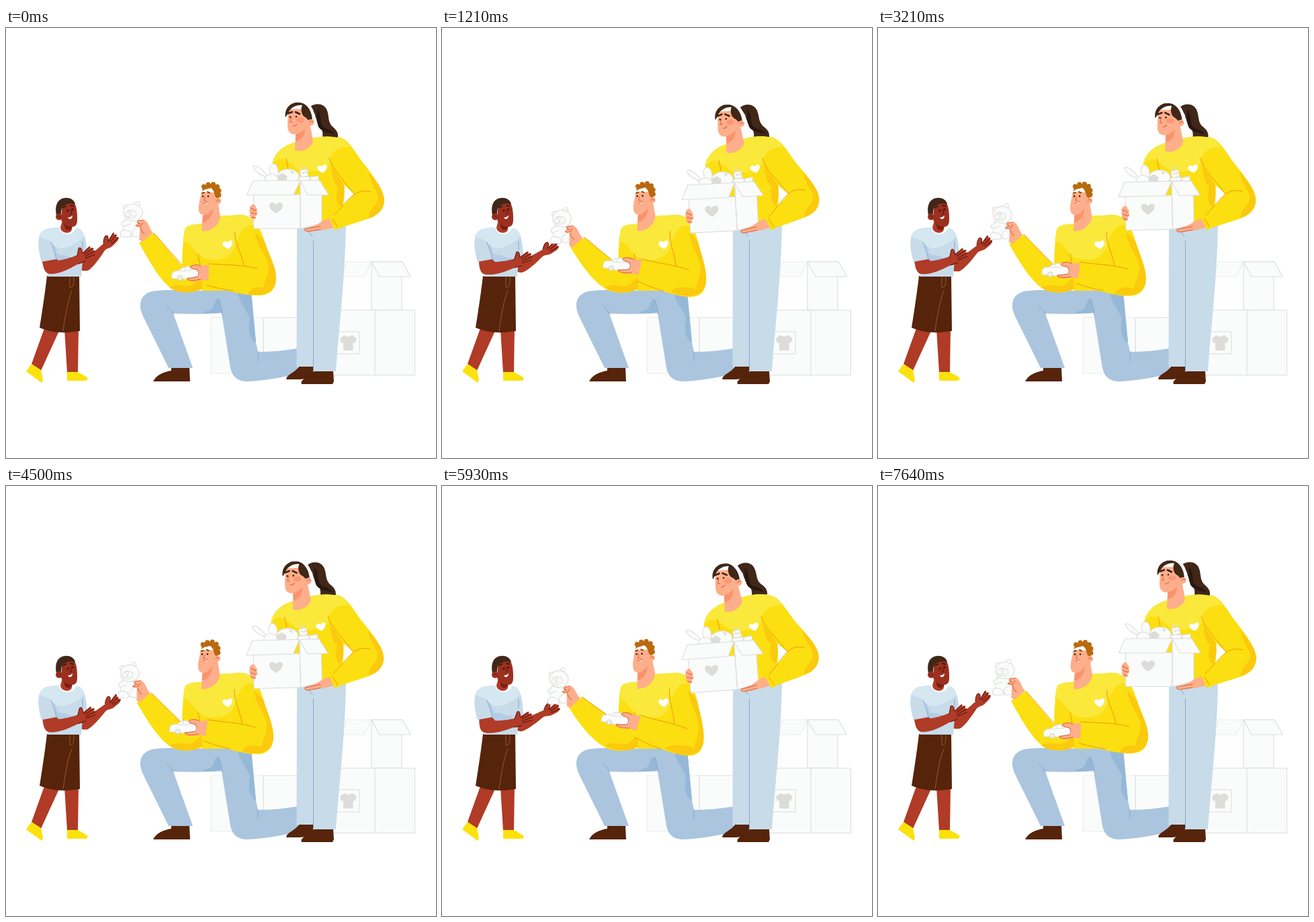
Animation of 640 by 640 pixels, one loop 7710 ms. Source, as an HTML page:

```html
<!DOCTYPE html>
<html lang="en">
<head>
<meta charset="utf-8">
<title>Toy donation</title>
<style>
html, body { margin: 0; width: 100%; height: 100%; overflow: hidden; background: #fff; }
svg { display: block; width: 100vw; height: 100vh; --k: 0; }
path, ellipse, circle { stroke-linecap: round; stroke-linejoin: round; }
/* --x, --y and --r say how far a part travels while --k goes from 0 to 1 */
.m {
  --x: 0; --y: 0; --r: 0;
  transform: translate(calc(var(--k) * var(--x) * 1px), calc(var(--k) * var(--y) * 1px))
    rotate(calc(var(--k) * var(--r) * 1deg));
}
.card { fill: #fafcfb; stroke: #dedddb; stroke-width: 1.1; }
.pale { stroke: #ecebea; }
.grey { fill: #dddcd8; }
.white { fill: #fff; }
.yel { fill: #fbdf10; }
.lite { fill: #fae83a; }
.gold { fill: #fbc90d; }
.seam { fill: none; stroke: #f2960f; stroke-width: 1; }
.skin { fill: #fdae8a; }
.blush { fill: #f9936d; }
.sline { fill: none; stroke: #e0603c; stroke-width: 1; }
.jean { fill: #abc5df; }
.denim { fill: #96b8d8; }
.sky { fill: #c8dbe9; }
.crease { fill: none; stroke: #83a6ca; stroke-width: 1; }
.dark { fill: #55240a; }
.boy { fill: #b03b27; }
.face { fill: #9c3020; }
.bline { fill: none; stroke: #58150d; stroke-width: 1; }
.hair { fill: #402718; }
.brow { fill: none; stroke: #3a2013; stroke-width: 2; }
.ginger { fill: #b96a0d; }
</style>
</head>
<body>
<svg viewBox="0 0 640 640">
  <defs>
    <path id="heart" d="M0 8C-5 5-10 1-10-4C-10-9-3-10 0-5C3-10 10-9 10-4C10 1 5 5 0 8Z"/>
  </defs>

  <g id="stack">
    <path class="card pale" d="M305 431H383V514H305Z"/>
    <path class="card" d="M383 431H490V516H383Z"/>
    <path d="M490 348H544V420H490Z" fill="#fdfefd"/>
    <path class="card pale" d="M508 348H544L533 370H498Z"/>
    <path class="card" d="M544 348H589V420H544Z"/>
    <path class="card" d="M544 348H590L602.500 370H556Z"/>
    <path class="card" d="M480 420H549V516.500H480ZM549 420H608.500V516.500H549Z"/>
    <path class="card" d="M480 452H526V485H480Z"/>
    <path class="grey" d="M504 457C507 460 512 460 515 457L522 462L519 469L516.500 468V480H502V468L499 469L497 462Z"/>
  </g>

  <g id="kneeling-legs">
    <path class="jean" d="M318 391H365L372 468L375 482C395 482 415 480 434 477V515C410 520 385 525 360 526C343 526 337 518 334 506L321 425Z"/>
    <path class="denim" d="M345 394H365L372 468C362 463 360 448 363 432C359 420 349 412 345 394Z"/>
    <path class="jean" d="M225 391C245 389 280 391 320 391L322 424C300 426 275 426 249 425L278 506H242L204 429C194 408 203 392 225 391Z"/>
    <path class="denim" d="M292 425C297 419 305 423 309 413C310 406 313 404 318 404L321 424Z"/>
    <path class="crease" d="M239 413L246 420L249 426M313 404C318 403 319 409 322 426M375 482V495"/>
    <path class="dark" d="M219 526C224 516 235 512 246 510V506H273L274 526Z"/>
  </g>

  <g id="standing-legs">
    <path class="dark" d="M417 522C419 515 430 513 436 504H457V518C450 522 443 523 433 523H418Z"/>
    <path class="dark" d="M440 530C437 523 450 521 458 511H487L488 526L486 530Z"/>
    <path class="sky" d="M433 290H506C505 370 496 440 491 511H457.500V504H432.500Z"/>
    <path class="crease" d="M457.500 317V510M452 304C453 307 454 309 456 310"/>
  </g>

  <g id="boy">
    <path class="boy" d="M57 447L79 451L52 510L38 500ZM87 448H108L107 513H91Z"/>
    <path d="M38 500L52 509L55 524L53 528L30 511ZM91 512H107L121 520Q123 525 117 525H91Z" fill="#fbe20c"/>
    <path class="dark" d="M61 369H109L110 451C100 452 92 454 82 453C70 453 60 450 50 446C54 420 58 395 61 369Z"/>
    <path d="M95 371V386C100 387 101 382 101 371M98 391C91 408 88 430 85 451" fill="none" stroke="#9a5733"/>
    <g class="m" style="--x:-2;--y:3;--r:15;transform-origin:118px 355px">
      <path class="boy" d="M108 345C122 343 133 331 145 321C145 315 147 308 150 309C153 310 152 313 152 316L159 305Q162 304 161 308L163 307Q166 307 164 311L167 311Q169 313 165 318L160 323C156 328 151 327 147 331C138 345 129 357 122 361C117 362 112 361 106 360Z"/>
      <path class="bline" d="M145 320C145 314 147 308 150 309C153 310 152 313 152 318M153 317L160 305M155 319L164 308M157 321L167 312"/>
    </g>
    <path class="sky" d="M79 297C64 297 51 299 49 313C47 325 50 337 53 348L70 344L62 370H112L114 346L121 344C121 328 119 308 112 301C109 298 105 298 101 297Z"/>
    <path d="M79 297C64 297 53 299 49 314C60 312 66 317 70 322C76 330 90 328 99 323C107 319 111 315 117 310C115 301 106 298 101 297Z" fill="#d5e7f1"/>
    <path d="M70 322C77 327 73 336 81 338C92 336 96 346 105 341L103 347L77 352Z" fill="#b3cde6"/>
    <path class="white" d="M79 296C80 309 100 311 104 298L100 296L97 302H86Z"/>
    <path class="boy" d="M84 286L81 297C82 307 98 307 98 299L99 288Z"/>
    <path d="M85 289L99 294C98 300 92 303 88 298Z" fill="#7b1f13"/>
    <path class="face" d="M84 257H97C102 259 104 264 105 270C106 276 106 281 106 285C106 292 104 296 98 296C89 295 84 291 82 285Z"/>
    <path class="hair" d="M75 279C74 273 73 266 77 259C82 252 92 251 98 255C101 257 103 260 103 263C97 259 92 262 86 264C81 268 83 275 81 280Z"/>
    <circle class="face" cx="79" cy="281" r="5"/>
    <path class="bline" d="M77 280Q80 278 81 283M96 270L98 276L95 277"/>
    <path d="M85 267L89 265M96 264L100 265" class="brow"/>
    <g fill="#3a0d08"><circle cx="92" cy="272" r="1.400"/><circle cx="99" cy="270" r="1.400"/></g>
    <path class="white" d="M92 282C95 282 97 281 99 279C99 285 94 286 92 282Z"/>
    <g class="m" style="--r:8;transform-origin:58px 356px">
      <path class="boy" d="M53 342L73 342L78 346C90 344 99 341 106 338L108 328Q111 325 113 331L114 334L124 325Q127 325 125 328L129 327Q132 328 129 331L132 331Q134 333 131 335L133 336Q134 339 128 341L120 346C115 350 111 350 106 352C95 358 81 366 66 366C57 366 55 355 53 342Z"/>
      <path class="bline" d="M106 339L108 328Q111 325 113 331L114 335M115 335L124 326M117 337L129 328M118 340L132 332M118 343L132 337M108 351L118 347"/>
    </g>
    <path class="sky" d="M50 311C60 314 67 320 70 326L75 344L53 348C49 335 47 322 50 311Z"/>
    <path class="crease" d="M67 319C71 328 73 336 75 344M114 318V330"/>
  </g>

  <g id="kneeling-man">
    <path class="yel" d="M293 291C280 293 269 292 266 300C263 320 262 342 262 365L292 391H366L372 300C368 284 358 278 348 278L317 280Z"/>
    <path class="lite" d="M293 291C280 293 269 292 266 300L263 317C279 318 279 339 300 344C325 349 341 337 343 314C342 297 353 291 366 290C360 278 348 278 317 280Z"/>
    <path class="seam" d="M286 337L289 354"/>
    <use href="#heart" class="white" transform="translate(330 323) rotate(-8) scale(.75)"/>

    <path class="yel" d="M220 305L265 358L292 362V388C280 395 262 395 250 390C231 380 214 348 198 320Z"
      data-to="M210 313L265 354L292 362V388C280 395 262 396 248 391C226 382 205 353 189 327Z"/>
    <path class="gold" d="M243 386C252 380 263 384 270 384C278 385 283 378 291 371L292 388C278 396 254 395 243 386Z"/>
    <path class="seam" d="M220 305L262 353" data-to="M210 313L262 353"/>
    <g class="m" style="--x:-12;--y:10.500;--r:-3;transform-origin:205px 298px">
      <g class="card">
        <circle cx="178" cy="267" r="3.700"/><circle cx="195" cy="262" r="3.700"/>
        <path d="M177 285C174 294 174 304 179 310L196 309C203 303 203 291 198 284Z"/>
        <ellipse cx="189" cy="274.500" rx="14" ry="12.500"/>
        <ellipse cx="186" cy="277" rx="8" ry="6"/>
        <path d="M178 287C171 289 170 293 175 295L184 292M177 301C170 300 168 309 173 311H186C188 303 182 301 177 301ZM194 298C187 299 186 308 191 311L200 310"/>
      </g>
      <path d="M182 274Q185 270 188 274L185 277ZM185 277V280L181 281M185 280L189 279" fill="none" stroke="#dedddb"/>
      <path class="skin" d="M219 305C213 299 213 289 205 285L196 287Q194 291 198 292L193 294Q195 297 200 295C198 302 200 307 198 315L203 318Z"/>
      <path class="sline" d="M204 286L196 287Q194 290 199 291L193 294Q196 297 201 294L204 290M200 296Q202 304 206 306"/>
    </g>

    <g class="m" style="--x:-1;--y:-1;--r:-2.800;transform-origin:305px 292px">
      <path class="skin" d="M291 244L312 245L316 262L319 281C317 296 302 304 291 302L293 278C287 277 286 272 287 263Z"/>
      <path class="blush" d="M293 279C300 278 307 272 308 268C308 280 302 287 292 290Z"/>
      <path class="ginger" d="M292 243C292 236 298 232 306 232C315 232 320 240 318 252L314 254C309 250 312 243 305 238C300 240 296 239 292 243Z"/>
      <g class="ginger"><circle cx="294.500" cy="236" r="3.500"/><circle cx="301" cy="233" r="3.500"/><circle cx="308.500" cy="232.500" r="3.500"/><circle cx="314.500" cy="236" r="3.500"/><circle cx="317" cy="242" r="3.500"/><circle cx="317" cy="248.500" r="3.500"/></g>
      <circle class="skin" cx="315.500" cy="257.500" r="4.500"/>
      <path class="sline" d="M313 258Q316 253 318 258M296 251L295 257H298"/>
      <path d="M292 246L295 245M300 244L303 245.500" class="brow" style="stroke:#8a4b08"/>
      <g fill="#321a10"><circle cx="293" cy="250.500" r="1.300"/><circle cx="301" cy="250.500" r="1.300"/></g>
      <path class="white" d="M294 260Q298 262 301 258Q300 265 294 260Z"/>
      <path class="sline" d="M294 260Q298 262 301 258"/>
    </g>

    <path class="yel" d="M349 278C368 278 378 295 385 318C392 340 402 355 402 372C402 389 393 398 376 398C350 398 322 389 299 383L302 351L355 353L341 310Z"
      data-to="M349 278C368 278 374 295 380 318C385 340 391 355 391 374C391 391 384 401 368 401C345 400 314 387 288 375L296 342L350 356L339 310Z"/>
    <path class="gold" d="M371 304C374 330 388 335 391 355C391 370 384 375 383 387C374 385 364 385 360 397C385 400 402 392 402 372C402 355 392 340 385 318Z"
      data-to="M367 304C370 330 380 335 383 353C384 370 379 378 376 390C364 384 345 384 335 391C363 405 391 404 391 374C391 355 385 340 380 318Z"/>
    <path class="lite" d="M349 278C360 278 368 285 374 295C357 290 349 302 345 315L341 310Z"
      data-to="M349 278C360 278 365 285 371 295C355 290 348 302 343 315L339 310Z"/>
    <path class="seam" d="M341 304C339 318 350 333 354 353M302 351C327 353 352 352 374 358M299 383C315 387 327 390 338 391"
      data-to="M339 302C337 318 345 335 347 354M296 342C320 350 345 352 366 361M288 375C303 382 315 388 327 391"/>
    <g class="m" style="--x:-9;--y:-10;--r:11;transform-origin:301px 368px">
      <path class="skin" d="M302 352C293 356 287 351 280 353Q273 355 274 358L283 360C278 362 273 368 269 373L276 376L288 374L301 376Z"/>
      <path class="card" d="M247 373Q245 363 252 362L258 361C263 355 271 354 279 356L285 361Q290 366 286 371L275 373Q271 370 267 374L263 373Z"/>
      <path d="M259 362L279 360M266 356V361" fill="none" stroke="#dedddb"/>
      <circle cx="259" cy="372" r="3.500" fill="#eeeeec" stroke="#d5d4d0"/>
      <path class="skin" d="M270 375Q271 371 280 371L290 368L293 375L278 377Z"/>
      <path class="skin" d="M302 353C291 357 286 351 278 353Q272 355 276 358L286 360L292 366L302 366Z"/>
      <path class="sline" d="M290 354Q283 351 276 354Q272 357 277 358L285 360Q289 366 285 370L270 373Q270 376 279 376L290 374"/>
    </g>
  </g>

  <g id="standing-woman">
    <g class="m" style="--r:-3.700;transform-origin:470px 297px">
      <path class="hair" d="M453 117C461 111 474 112 478 123C481 131 479 139 485 146C491 151 495 155 494 163L471 163C474 148 462 145 460 129Z"/>
      <path d="M463 121C471 128 466 139 471 146C475 151 484 150 489 158C478 156 465 153 464 143C461 137 464 130 463 121Z" fill="#291710"/>
      <path class="yel" d="M396 212C397 187 413 174 432 170L456 164C480 159 502 161 511 174L503 230C506 250 500 268 500 294H400Z"/>
      <path class="lite" d="M396 203C399 185 413 174 432 170L456 164C480 159 502 161 513 177C492 177 488 188 484 199C476 215 447 218 432 209C417 195 408 188 396 203Z"/>
      <path class="gold" d="M484 205C491 217 497 225 503 233C504 247 503 255 499 266C491 262 491 250 494 237C485 228 486 216 484 205Z"/>
      <path class="seam" d="M417 194L420 210"/>
      <use href="#heart" class="white" transform="translate(471 210) rotate(-10) scale(.73)"/>
      <g class="m" style="--x:-1;--y:1.300">
        <path class="skin" d="M420 121L450 120L453 146L457 168C456 178 441 186 430 182L431 158C423 159 419 154 419 146Z"/>
        <path class="blush" d="M431 158C438 157 443 152 445 150C445 162 438 167 431 169Z"/>
        <ellipse cx="438" cy="137" rx="6" ry="4" fill="#fb9878"/>
        <path class="hair" d="M416 133C414 119 424 110 438 110C451 110 459 120 458 136L452 139L446 133C440 131 438 121 441 115C433 114 423 118 420 127Z"/>
        <path d="M432 110C446 108 456 120 457 137C460 130 456 112 441 109Z" class="white" stroke="#fff" stroke-width="2"/>
        <path d="M461 133C463 137 463 143 462 148L459 143Z" class="white"/>
        <circle class="skin" cx="454" cy="140.500" r="4.800"/>
        <path class="sline" d="M452 141Q455 136 457 140M425 132L423 140H426M427 146Q431 146 433 143"/>
        <path d="M420 127L426 125M431 125L437 128" class="brow" style="stroke-width:2.600"/>
        <g fill="#321a10"><circle cx="423" cy="132.500" r="1.300"/><circle cx="432" cy="132" r="1.300"/></g>
      </g>
    </g>

    <g class="m" style="--x:1.300;--y:1.800;--r:-3.700;transform-origin:470px 297px">
      <g class="card">
        <path d="M388 222C379 220 369 212 368 206C372 202 381 210 388 219ZM395 220C390 209 393 202 399 202C405 204 406 214 405 222Z"/>
        <ellipse cx="395" cy="225" rx="10" ry="7.500"/>
        <ellipse cx="420" cy="221" rx="16" ry="11"/>
        <path d="M437 212L448 210L450 220L439 222ZM440 211L438 206M445 210L443 205M436 222L452 221V230H436ZM453 222L465 220V228H453Z"/>
      </g>
      <g class="grey"><path d="M404 220L412 216L419 221L417 228H406ZM422 212L428 213L427 218Z"/><circle cx="442" cy="215.500" r="1.500"/><circle cx="446" cy="215" r="1.500"/></g>
      <g class="card">
        <path d="M438 227H467L470 248V291L438 298.500Z"/>
        <path d="M368.500 248H438V298.500H368.500Z"/>
        <path d="M368 227H438L428 248.500H358.500Z"/>
        <path d="M438 227H467L480 248.500H449Z"/>
        <path d="M438 227V298" fill="none"/>
      </g>
      <use href="#heart" class="grey" transform="translate(402 268)"/>
      <path class="skin" d="M368 262Q362 265 363 269Q361 274 364 276Q361 280 365 281Q364 285 371 284L372 279Q376 276 373 273Q375 269 372 267Q370 262 368 262Z"/>
      <path class="sline" d="M364 268L372 272M364 275L373 277M365 281L371 283"/>
    </g>

    <g class="m" style="--r:-4;transform-origin:487px 293px">
      <path class="skin" d="M482 284C473 285 468 290 460 294L445 299Q444 302 449 303L466 301C473 301 480 299 488 297Z"/>
      <path class="sline" d="M468 295L445 299Q443 302 449 303L468 300"/>
    </g>
    <path class="yel" d="M495 162C509 165 515 178 531 200C548 222 562 240 563 256C563 268 555 278 542 283C525 289 505 294 489 301L481 282C497 271 506 260 518 247L503 233L482 198C483 184 489 178 505 176Z"
      data-to="M487 162C502 165 509 178 525 200C544 222 560 238 561 254C561 268 553 276 541 281C524 288 505 293 490 301L481 284C495 272 504 260 515 247L498 233L476 198C476 184 483 178 499 176Z"/>
    <path class="lite" d="M494 162C503 164 508 169 513 177C494 177 485 184 482 198L475 175Z"
      data-to="M486 162C496 164 501 169 506 177C488 178 479 185 476 198L470 175Z"/>
    <path class="gold" d="M540 214C542 234 554 241 554 253C553 265 540 268 540 283C556 278 563 268 563 256C562 240 550 228 540 214Z"
      data-to="M536 213C540 232 552 241 552 252C552 264 539 266 539 281C554 276 561 268 561 254C560 239 547 227 536 213Z"/>
    <path class="seam" d="M481 194C486 211 505 229 518 247M487 279C499 269 510 252 521 246C529 242 536 242 543 244M486 284L493 296"
      data-to="M476 194C480 211 501 229 515 247M487 280C498 269 507 252 518 244C526 239 533 239 540 241M486 284L494 296"/>
  </g>
</svg>
<script>
const LOOP = 7710, STEP = LOOP / 108, SWING = 3820, LEAD = 40, REACH = 1.175;
const svg = document.querySelector('svg');
const numbers = /-?\d+(\.\d+)?/g;

const morphs = [...document.querySelectorAll('[data-to]')].map(el => {
  const d = el.getAttribute('d');
  const to = el.dataset.to.match(numbers).map(Number);
  return k => {
    let i = 0;
    el.setAttribute('d', d.replace(numbers, n => (+n + (to[i++] - n) * k).toFixed(2)));
  };
});

function draw() {
  const t = Math.floor(performance.now() % LOOP / STEP) * STEP;
  const k = REACH * (1 - Math.cos(2 * Math.PI * (t + LEAD) / SWING)) / 2;
  svg.style.setProperty('--k', k.toFixed(4));
  morphs.forEach(morph => morph(k));
  requestAnimationFrame(draw);
}
draw();
</script>
</body>
</html>
```
